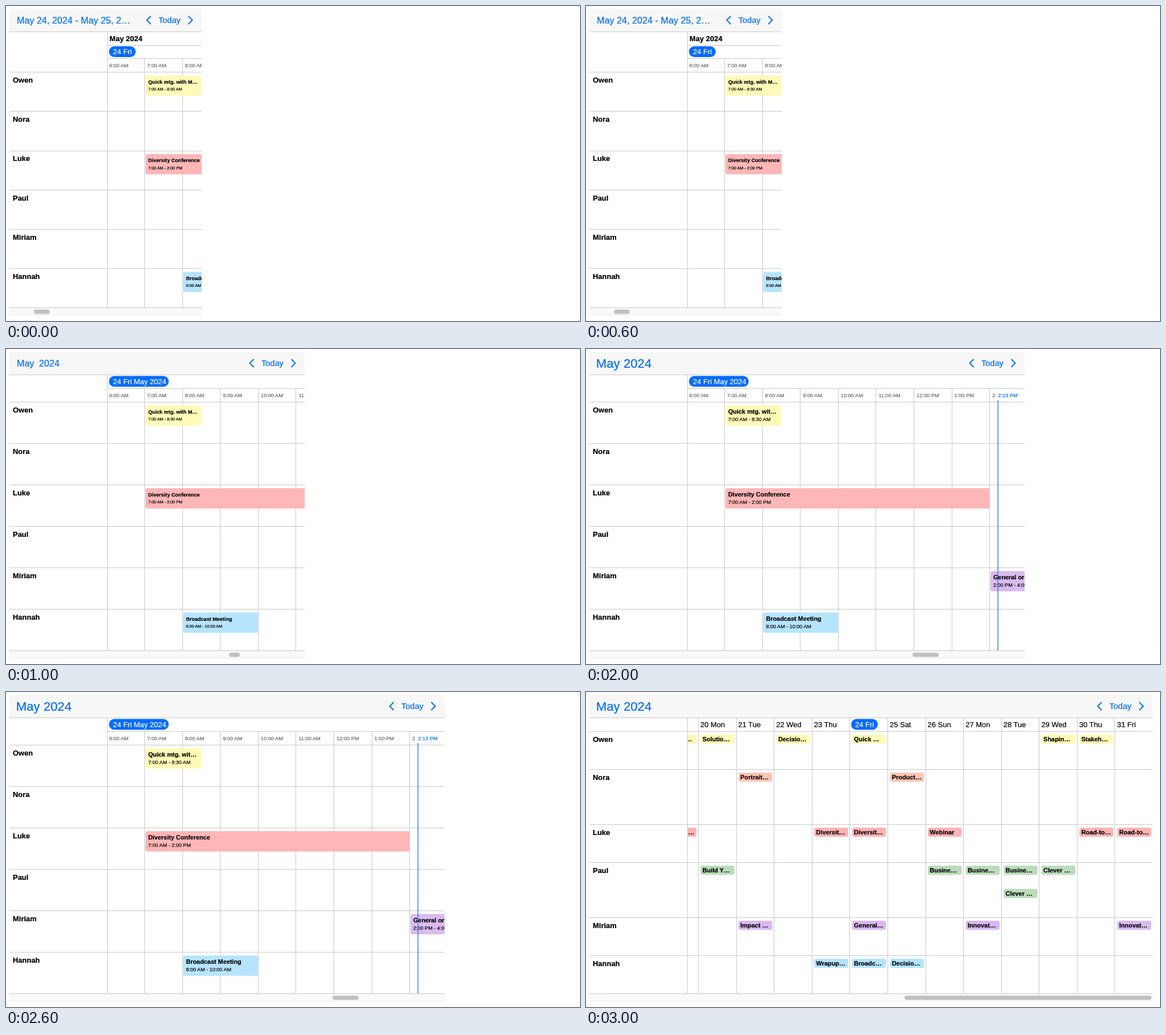
These frames come from a looping animation (1009 px wide and 555 px high, 4000 ms). An HTML page:

```html
<!DOCTYPE html>
<html lang="en">
<head>
<meta charset="utf-8">
<title>Responsive timeline</title>
<style>
html, body { margin: 0; width: 100%; height: 100%; overflow: hidden; background: #fff; }
svg { display: block; }
text { font-family: "Liberation Sans", Arial, Helvetica, sans-serif; white-space: pre; stroke-width: .2px; }
</style>
</head>
<body>
<svg id="stage" width="1009" height="555"></svg>
<script>
const BLUE = '#006bff', LINE = '#c8c8c8', LEFT = 6, GRID = 178, BOTTOM = 531, COL = 66.6;
const STEP = 1000;
const people = ['Owen', 'Nora', 'Luke', 'Paul', 'Miriam', 'Hannah'];
const tints = ['#fffab6', '#ffc4b5', '#ffb3b5', '#bbdcba', '#d9b9f0', '#b3e3ff'];

const rect = (x, y, w, h, fill, r = 0, more = '') =>
  `<rect x="${x}" y="${y}" width="${w}" height="${h}" rx="${r}" fill="${fill}" ${more}/>`;
const text = (x, y, size, str, color = '#000', weight = 400) =>
  `<text x="${x}" y="${y}" font-size="${size}" fill="${color}" stroke="${color}" font-weight="${weight}">${str}</text>`;
const bold = (x, y, size, str) => text(x, y, size, str, '#000', 700);
const hLine = (x, y, end) => rect(x, Math.round(y), end - x, 1, LINE);
const vLine = (x, y) => rect(Math.floor(x), y, 1, BOTTOM - y, LINE);
const chevron = (x, dir) =>
  `<path d="M${x} 18l${7 * dir} 7l${-7 * dir} 7" fill="none" stroke="${BLUE}" stroke-width="1.9"/>`;
const pill = (x, y, w, str) =>
  rect(x, y, w, 19, BLUE, 9.5) + text(x + 7, y + 14, 12.96, str, '#fff');

function toolbar(w, title) {
  return rect(LEFT, 5, w - LEFT, 40, '#f7f7f7') + hLine(LEFT, 45, w) + title +
    chevron(w - 89.5, -1) + text(w - 76, 30, 14.5, 'Today', BLUE) + chevron(w - 23.5, 1);
}

// Name column, row rules and scrollbar
function frame(w, rows, thumb) {
  const [from, to] = thumb;
  return rect(LEFT, 46, GRID - LEFT, BOTTOM - 46, '#fff') + vLine(GRID, 45) +
    rows.map((y, i) => hLine(LEFT, y, w) + bold(12, y + 18.7, 12.96, people[i])).join('') +
    rect(LEFT, BOTTOM, w - LEFT, 14, '#f9f9f8') + hLine(LEFT, BOTTOM, w) +
    rect(LEFT, 544, w - LEFT, 1, '#ececec') +
    rect(from, 535, to - from, 7.5, '#c1c1c1', 3.75);
}

function hours(w, top) {
  let out = '';
  for (let i = 0; i < 9; i++) {
    const hour = i + 6, x = i ? 243.4 + COL * (i - 1) : GRID;
    const label = `${hour > 12 ? hour - 12 : hour}:00 ${hour < 12 ? 'AM' : 'PM'}`;
    if (i) out += vLine(x, top);
    out += text(x + (i ? 4.6 : 3.4), top + 16.2, 9.26, label, '#666');
  }
  return out + hLine(GRID, top, w);
}

function meeting(row, who, x, width, title, time, big) {
  return rect(x, row + 6.3, width, 35.6, tints[who], 3.5, 'fill-opacity=".96"') +
    bold(x + 4.9, row + 20.5, big ? 10.88 : 9.07, title) +
    text(x + 5, row + (big ? 34.2 : 33), big ? 9.06 : 7.26, time);
}

function dayScene({ w, title, top, rows, thumb, big, head, now = '' }) {
  const meet = (who, ...rest) => meeting(rows[who], who, ...rest, big);
  return toolbar(w, title) + hours(w, top) +
    meet(0, 245, 98, big ? 'Quick mtg. wit…' : 'Quick mtg. with M…', '7:00 AM - 8:30 AM') +
    meet(2, 245, 465, 'Diversity Conference', '7:00 AM - 2:00 PM') +
    meet(4, 711, 131, 'General orientation', '2:00 PM - 4:00 PM') +
    meet(5, 311.5, 132, 'Broadcast Meeting', '8:00 AM - 10:00 AM') +
    frame(w, rows, thumb) + head + now;
}

function monthScene(w) {
  const rows = [69, 136, 233, 300, 397, 464];
  const days = ['Mon', 'Tue', 'Wed', 'Thu', 'Fri', 'Sat', 'Sun'];
  // Each entry: date, label, optional lane
  const plan = [
    [[20, 'Solutio…'], [22, 'Decisio…'], [24, 'Quick …'], [29, 'Shapin…'], [30, 'Stakeh…']],
    [[21, 'Portrait…'], [25, 'Product…']],
    [[23, 'Diversit…'], [24, 'Diversit…'], [26, 'Webinar'], [30, 'Road-to…'], [31, 'Road-to…']],
    [[20, 'Build Y…'], [26, 'Busine…'], [27, 'Busine…'], [28, 'Busine…'], [28, 'Clever …', 1], [29, 'Clever …']],
    [[21, 'Impact …'], [24, 'General…'], [27, 'Innovat…'], [31, 'Innovat…']],
    [[23, 'Wrapup…'], [24, 'Broadc…'], [25, 'Decisio…']]
  ];
  const xOf = date => 197.4 + COL * (date - 20);
  const chip = (who, date, label, lane = 0, indent = 7.3) => {
    const x = xOf(date), y = rows[who] + 6 + lane * 41;
    return rect(x + 4, y, 59.5, 16, tints[who], 3.5) + bold(x + indent, y + 11.8, 10.95, label);
  };
  let out = toolbar(w, bigTitle), head = '';
  for (let d = 20; d < 32; d++) {
    const x = xOf(d), label = `${d} ${days[(d - 20) % 7]}`;
    out += vLine(x, 45);
    head += d === 24 ? pill(466, 47.5, 47, label) : text(x + 3.6, 61.5, 12.96, label);
  }
  plan.forEach((list, who) => list.forEach(item => out += chip(who, ...item)));
  out += chip(0, 19, '…', 0, 44.7) + chip(2, 19, '…', 0, 48.8);
  return out + frame(w, rows, [560, 994]) + head;
}

const smallTitle = (x, str) => text(x, 30.8, 16.2, str, BLUE);
const bigTitle = text(17.8, 33, 22.2, 'May 2024', BLUE);
const rowsFrom = (top, gap) => people.map((_, i) => top + gap * i);
const longPill = pill(181, 47.5, 105, '24 Fri May 2024');
const nowMark = rect(719.7, 73, 43, 17, '#fff') + text(724.3, 85.4, 9.26, '2:13 PM', BLUE) +
  rect(723.5, 90, 1.2, BOTTOM - 90, BLUE);

const scenes = [
  [344, dayScene({
    w: 344, top: 92, rows: rowsFrom(116.2, 69.2), thumb: [49, 77],
    title: smallTitle(19, 'May 24, 2024 - May 25, 2…'),
    head: hLine(GRID, 69, 344) + bold(182, 61.5, 12.96, 'May 2024') + pill(181, 71, 47, '24 Fri')
  })],
  [525, dayScene({
    w: 525, top: 69, rows: rowsFrom(93, 73), thumb: [392, 411], head: longPill,
    title: smallTitle(19, 'May') + smallTitle(58, '2024')
  })],
  [771, dayScene({
    w: 771, top: 69, rows: rowsFrom(93, 73), thumb: [574, 620], head: longPill,
    title: bigTitle, big: true, now: nowMark
  })],
  [996, monthScene(996)]
];

const stage = document.getElementById('stage');
stage.innerHTML = scenes.map(([w, body]) =>
  `<svg width="${w}" height="555" overflow="hidden">${body}</svg>`).join('');
const views = [...stage.children];

const start = performance.now();
function draw(time) {
  const active = Math.floor(Math.max(0, time - start) / STEP) % views.length;
  views.forEach((view, i) => view.style.display = i === active ? 'block' : 'none');
  requestAnimationFrame(draw);
}
draw(start);
</script>
</body>
</html>
```
